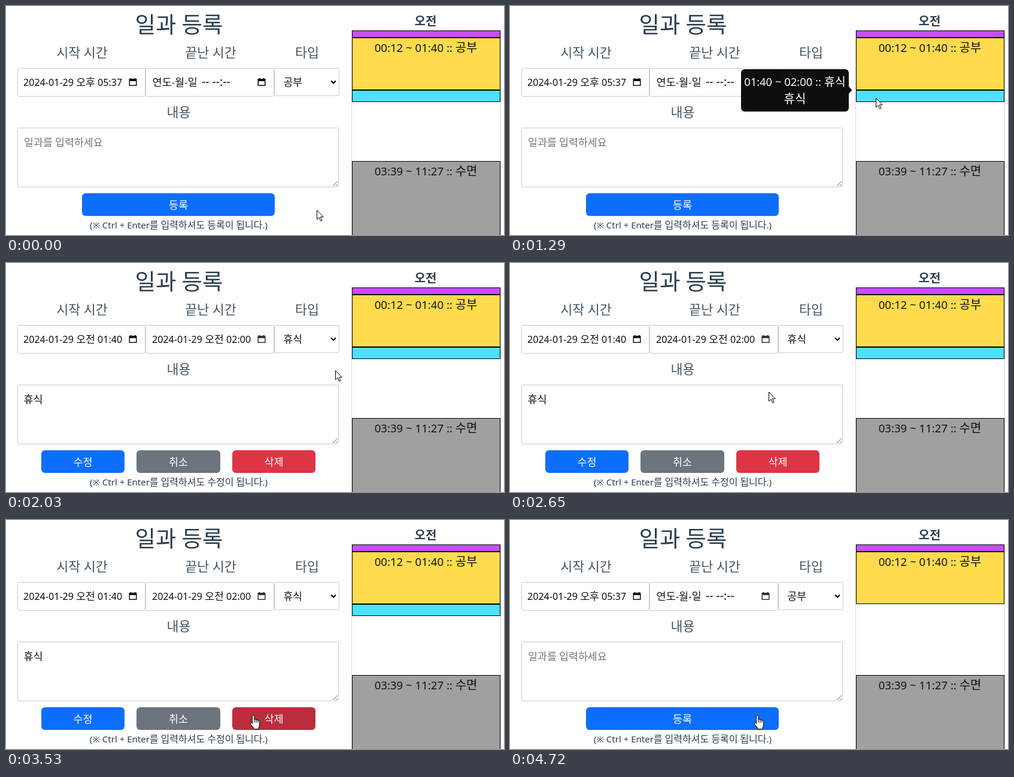
Recreate the animation shown at these times as an HTML page. Size 832 px wide and 384 px high, loop 5460 ms.

```html
<!DOCTYPE html>
<html lang="ko">
<head>
<meta charset="utf-8">
<style>
  html, body { margin: 0; width: 100%; height: 100%; overflow: hidden; background: #fff; }
  svg {
    display: block; width: 832px; height: 384px; font-weight: 300; fill: #111;
    font-family: "Noto Sans", "Noto Sans CJK KR DemiLight", "Noto Sans CJK KR", sans-serif;
  }
  .ko { font-size: 1.07em; }
  .mid { text-anchor: middle; }
  .slate { fill: #2c3e50; }
  .label { fill: #465564; }
  .bold { font-weight: 700; }
  .white { fill: #fff; font-weight: 400; }
  .hint { fill: #757575; font-weight: 400; }
  .field { fill: #fff; stroke: #ccc; }
  .block { stroke: #000; }
</style>
</head>
<body>
<svg id="stage" viewBox="0 0 832 384"></svg>
<script>
const LOOP = 5460, EDIT_START = 1490, HOVER_START = 3060, DELETED = 4720;

// Hangul is set slightly larger than the Latin text beside it.
const text = (x, y, size, str, cls = '') =>
  `<text x="${x}" y="${y}" font-size="${size}" class="${cls}">` +
  str.replace(/[가-힣]+/g, '<tspan class="ko">$&</tspan>') + '</text>';

const box = (x, y, w, h, attrs) => `<rect x="${x}" y="${y}" width="${w}" height="${h}" ${attrs}/>`;

const field = (x, y, w, h) => box(x + .5, y + .5, w - 1, h - 1, 'rx="2" class="field"');

const block = (y, h, color, label) =>
  box(578.5, y + .5, 247, h - 1, `fill="${color}" class="block"`) +
  (label ? text(701.5, y + 24, 18.6, label, 'mid') : '');

const button = (x, w, color, label, id = '') =>
  box(x, 314, w, 38, `rx="6" fill="${color}" id="${id}"`) +
  text(x + w / 2, 339.5, 16.3, label, 'mid white');

const calendar = (x, id) =>
  `<path id="${id}" d="M${x} 122h2v-1h2v1h5v-1h2v1h2v12h-13zm1.5 4v6.5h10v-6.5z" fill-rule="evenodd"/>`;

const note = verb => text(288.5, 372.5, 15, `(※ Ctrl + Enter를 입력하셔도 ${verb}이 됩니다.)`, 'mid slate');

const stage = document.getElementById('stage');
stage.innerHTML = `
  ${text(289, 44.5, 35, '일과 등록', 'mid slate')}
  ${text(127, 85.5, 20.4, '시작 시간', 'mid label')}
  ${text(342, 85.5, 20.4, '끝난 시간', 'mid label')}
  ${text(503, 85.5, 20.4, '타입', 'mid label')}
  ${text(288.5, 186, 20.4, '내용', 'mid label')}
  ${field(19, 104, 214, 48)}${field(233, 104, 215, 48)}${field(448, 104, 109, 47)}
  ${field(19, 204, 537, 100)}
  ${calendar(205.5, 'startIcon')}${calendar(420.5, 'endIcon')}
  <path d="M543 125.5l4 4 4-4" fill="none" stroke="#000" stroke-width="2"/>
  <path d="M546 302l8-8M551 302l3-3" stroke="#666"/>

  ${text(701, 33, 18.7, '오전', 'mid slate bold')}
  <path d="M577.5 40V384M826.5 40V384" stroke="#ddd"/>
  ${block(41, 12, '#c84dff')}
  ${block(53, 88, '#ffdb4d', '00:12 ~ 01:40 :: 공부')}
  <g id="rest">${block(141, 20, '#4de1ff')}</g>
  ${block(260, 140, '#a0a09e', '03:39 ~ 11:27 :: 수면')}

  <g id="createForm">
    ${text(29, 134, 16.1, '2024-01-29 오후 05:37')}
    ${text(244.5, 134, 16.4, '연도-월-일')}${text(327, 134, 19.4, '-- --:--')}
    ${text(463.5, 134, 16, '공부')}
    ${text(30, 234.5, 16.2, '일과를 입력하세요', 'hint')}
    ${button(127, 322, '#0d6efd', '등록')}
    ${note('등록')}
  </g>
  <g id="editForm">
    ${text(29, 134, 16.1, '2024-01-29 오전 01:40')}
    ${text(244, 134, 16.1, '2024-01-29 오전 02:00')}
    ${text(463.5, 134, 16, '휴식')}
    ${text(29.5, 234.5, 16.3, '휴식')}
    ${button(59, 139, '#0d6efd', '수정')}
    ${button(218, 140, '#6c757d', '취소')}
    ${button(378, 139, '#dc3545', '삭제', 'deleteButton')}
    ${note('수정')}
  </g>

  <g id="tooltip">
    ${box(386, 106, 180, 71, 'rx="6" fill="#000"')}
    <path d="M566 135l5.5 6-5.5 6z" fill="#000"/>
    ${text(476, 133.5, 18.4, '01:40 ~ 02:00 :: 휴식', 'mid white')}
    ${text(476, 163, 18.7, '휴식', 'mid white')}
  </g>
  <path id="arrow" d="M.5.5v15.3l3.6-3.3 2.6 6 2.3-1-2.6-5.8h4.8z" fill="#fff" stroke="#000"/>
  <g id="hand" stroke="#000">
    <path fill="#fff" d="M-1.5 14.5V2a1.7 1.7 0 0 1 3.4 0V8.5a1.5 1.5 0 0 1 3 .5 1.5 1.5 0 0 1 3 .8 1.4 1.4 0 0 1 2.6 1V16c0 3-1.5 4-1.5 7.5H1c0-3.5-5-6-5.8-9.5 0-2 2-2 3.3.5z"/>
    <path d="M1.9 8.5v4M4.9 9v4M7.9 9.8v3.2"/>
  </g>`;

const part = Object.fromEntries([...stage.querySelectorAll('[id]')].map(el => [el.id, el]));

// Pointer waypoints: time, x, y of the hot spot.
const path = [
  [262, 519, 342], [398, 512, 336], [534, 517, 300], [670, 542, 245], [874, 584, 177],
  [1078, 604, 160], [1214, 609, 155], [1350, 612, 153], [1894, 612, 153], [2030, 550, 180],
  [2234, 505, 183], [2438, 473, 181], [2642, 432, 216], [2846, 392, 278], [2982, 392, 312],
  [3050, 404, 321], [3118, 412, 326], [3322, 412, 326], [3526, 413, 327]
];

const clamp = v => Math.min(1, Math.max(0, v));
const ramp = (t, from, to) => clamp((t - from) / (to - from));
const show = (el, on) => el.style.display = on ? '' : 'none';

function pointerAt(t) {
  const next = path.findIndex(p => p[0] > t);
  if (next === 0) return path[0].slice(1);
  if (next < 0) return path.at(-1).slice(1);
  const [a, b] = [path[next - 1], path[next]];
  const k = ramp(t, a[0], b[0]);
  return [1, 2].map(i => Math.round(a[i] + (b[i] - a[i]) * k));
}

function draw(t) {
  const editing = t >= EDIT_START && t < DELETED;
  show(part.createForm, !editing);
  show(part.editForm, editing);
  show(part.rest, t < DELETED);
  part.endIcon.setAttribute('fill', t < EDIT_START ? '#000' : '#333');
  part.tooltip.style.opacity = ramp(t, 1150, 1300) - ramp(t, 1950, 2025);

  const hover = ramp(t, HOVER_START - 30, HOVER_START + 120);
  const mix = (a, b) => Math.round(a + (b - a) * hover);
  part.deleteButton.setAttribute('fill', `rgb(${mix(220, 187)},${mix(53, 45)},${mix(69, 59)})`);

  // The pointer is refreshed about fifteen times a second.
  const [x, y] = pointerAt(Math.floor((t + 10) / 68) * 68 - 10);
  const pointing = t >= HOVER_START;
  show(part.arrow, !pointing);
  show(part.hand, pointing);
  (pointing ? part.hand : part.arrow).setAttribute('transform', `translate(${x} ${y})`);
}

const start = performance.now();
function tick() {
  draw((performance.now() - start) % LOOP);
  requestAnimationFrame(tick);
}
tick();
</script>
</body>
</html>
```
